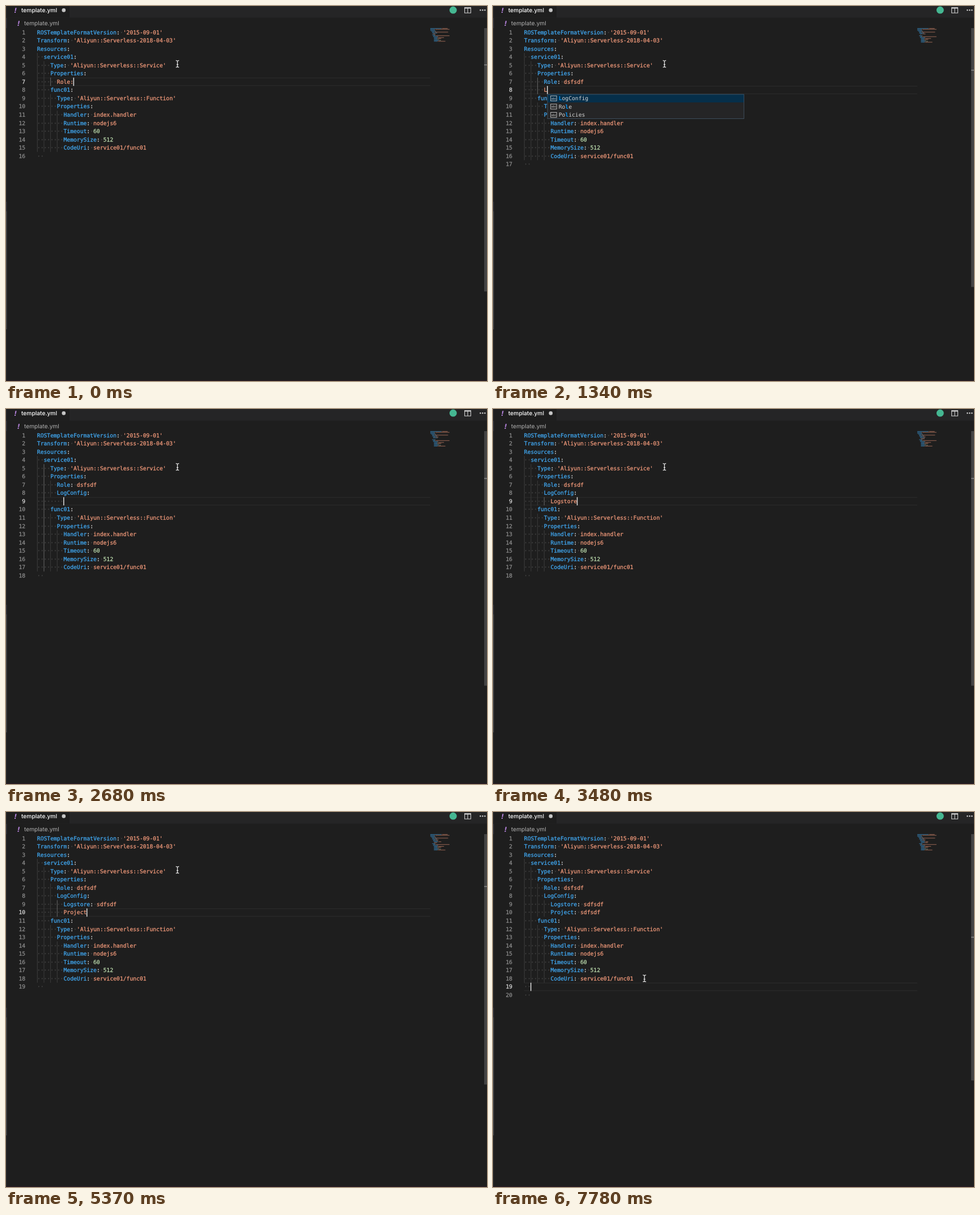
Write an HTML page that moves like this. It is 848 by 661 pixels and loops after 8 s.

```html
<!DOCTYPE html>
<html lang="en">
<head>
<meta charset="utf-8">
<title>template.yml</title>
<style>
  html, body { margin: 0; width: 100%; height: 100%; overflow: hidden; background: #1e1e1e; }
  svg { display: block; width: 848px; height: 661px; }
  text { white-space: pre; text-rendering: geometricPrecision; }
  .code { font: 9.7px "DejaVu Sans Mono", monospace; stroke-width: .28px; }
  .ui { font: 10.2px Inter, "Liberation Sans", sans-serif; }
  .title { font-weight: 500; }
  .mark { font: italic bold 12px "DejaVu Sans", sans-serif; fill: #b180d7; }
  .hit { fill: #0097fb; font-weight: bold; }
</style>
</head>
<body>
<svg viewBox="0 0 848 661">
  <rect width="848" height="661" fill="#1e1e1e"/>
  <rect width="848" height="20.5" fill="#252526"/>
  <rect width="112" height="20.5" fill="#1e1e1e"/>
  <g id="chrome">
    <rect width="1.5" height="661" fill="#29292a"/>
    <rect y="21" width="1.5" height="18" fill="#37373d"/>
    <rect y="345" width="1.5" height="17" fill="#37373d"/>
    <rect y="362" width="1.5" height="208" fill="#4b4b4b"/>
    <rect y="659.5" width="848" height="1.5" fill="#291a22"/>
    <text class="mark" x="14" y="12">!</text>
    <text class="ui title" x="27" y="11.3" fill="#fff">template.yml</text>
    <circle cx="101.8" cy="7.4" r="3.3" fill="#c5c5c5"/>
    <text class="mark" x="19.5" y="34.5">!</text>
    <text class="ui" x="32" y="33.8" fill="#b0b0b0">template.yml</text>
    <circle cx="788.3" cy="7.2" r="6.4" fill="#45b792"/>
    <path d="M808.6 3.5H819.4V12.3H808.6ZM814 3.5V12.3" fill="none" stroke="#d0d0d0" stroke-width="1.1"/>
    <rect x="808" y="2.2" width="12" height="2.3" fill="#d0d0d0"/>
    <g fill="#d0d0d0">
      <circle cx="836.3" cy="7.2" r="1.2"/><circle cx="840.3" cy="7.2" r="1.2"/><circle cx="844.3" cy="7.2" r="1.2"/>
    </g>
  </g>
  <g id="editor"></g>
  <g id="mouse" fill="none" stroke="#f0f0f0" stroke-width="1.2">
    <path d="M-2.8 -5.8Q-.4 -5.8 0 -4.6Q.4 -5.8 2.8 -5.8M0 -4.6V4.8M-2.8 6Q-.4 6 0 4.8Q.4 6 2.8 6M-1.5 1.4H1.5"/>
  </g>
</svg>
<script>
const LOOP = 8000, TOP = 39, LEFT = 54.8, ROW = 14.55, CHAR = 5.84, VIEW = 626;
const MAP = { x: 748, row: 1.616, char: 0.806 };
const KEY = '#41a9f3', STR = '#f0997a', NUM = '#bcdcae', PLAIN = '#dedede', DOT = '#484848';

const head = `ROSTemplateFormatVersion: '2015-09-01'
Transform: 'Aliyun::Serverless-2018-04-03'
Resources:
  service01:
    Type: 'Aliyun::Serverless::Service'
    Properties:`.split('\n');
const tail = `    func01:
      Type: 'Aliyun::Serverless::Function'
      Properties:
        Handler: index.handler
        Runtime: nodejs6
        Timeout: 60
        MemorySize: 512
        CodeUri: service01/func01`.split('\n');

const IN6 = ' '.repeat(6), IN8 = ' '.repeat(8);
const role = [IN6 + 'Role: dsfsdf'];
const config = [...role, IN6 + 'LogConfig:'];
const store = [...config, IN8 + 'Logstore: sdfsdf'];
const done = [...store, IN8 + 'Project: sdfsdf'];
const NEAR = [267, 293.2];

// [start, typed lines, options]; the caret sits at the end of the last typed line by default
const steps = [
  [0, [IN6 + 'Role:'], { raw: STR }],
  [270, [IN6 + 'Role: ds']],
  [540, role],
  [800, [...role, IN6]],
  [1340, [...role, IN6 + 'L'], { raw: STR, list: ['LogConfig', 'Role', 'Policies'], hit: 1 }],
  [1880, [...role, IN6 + 'Log'], { raw: PLAIN }],
  [2140, [...role, IN6 + 'LogConfig'], { raw: PLAIN }],
  [2410, config],
  [2680, [...config, IN8]],
  [3220, [...config, IN8 + 'L'], { raw: STR, list: ['Logstore'], hit: 1 }],
  [3480, [...config, IN8 + 'Logstore'], { raw: STR }],
  [3750, [...config, IN8 + 'Logstore:']],
  [4020, [...config, IN8 + 'Logstore: sd']],
  [4290, store],
  [4560, [...store, IN8]],
  [5100, [...store, IN8 + 'P'], { raw: STR, list: ['Project'], hit: 1 }],
  [5370, [...store, IN8 + 'Project'], { raw: STR }],
  [5640, [...store, IN8 + 'Project: ']],
  [5910, [...store, IN8 + 'Project: sdfs'], { list: ['sdfsdf'], hit: 4 }],
  [6180, done, { list: ['sdfsdf'], hit: 6 }],
  [6440, done, { list: ['sdfsdf'], hit: 6, mouse: [264, 290.5] }],
  [6710, done, { list: ['sdfsdf'], hit: 6, mouse: NEAR, caretOff: true }],
  [6980, done, { mouse: NEAR, row: 17 }],
  [7240, done, { mouse: NEAR, row: 18, blank: 8 }],
  [7510, done, { mouse: NEAR, row: 18, blank: 4 }],
  [7780, done, { mouse: NEAR, row: 18, blank: 2 }]
];

const rect = (x, y, w, h, fill, extra = '') =>
  `<rect x="${x}" y="${y}" width="${w}" height="${h}" fill="${fill}" ${extra}/>`;
const text = (x, y, body, attrs = '') => `<text class="code" x="${x}" y="${y}" ${attrs}>${body}</text>`;
const ink = color => `fill="${color}" stroke="${color}"`;
const span = (body, color) => `<tspan ${ink(color)}>${body}</tspan>`;
const rowY = row => TOP + row * ROW;
const colX = col => LEFT + col * CHAR;
const indentOf = line => line.search(/\S|$/);

function tokens(line, raw) {
  const pad = indentOf(line), body = line.slice(pad);
  const list = [[line.slice(0, pad), DOT]];
  const pair = !raw && body.match(/^([^:]+)(:)(\s*)(.*)$/);
  if (!pair) return [...list, [body, raw || PLAIN]];
  const [, key, colon, gap, value] = pair;
  return [...list, [key, KEY], [colon, PLAIN], [gap, DOT], [value, /^\d+$/.test(value) ? NUM : STR]];
}

// Blank lines take their depth from the next line that has text.
function guideDepths(lines) {
  return lines.map((line, i) => {
    const next = line.trim() ? line : lines.slice(i).find(l => l.trim()) || '';
    return Math.ceil(indentOf(next) / 2);
  });
}

function drawGuides(lines, active) {
  const depths = guideDepths(lines), depth = depths[active];
  let from = active, to = active;
  while (depths[from - 1] >= depth) from--;
  while (depths[to + 1] >= depth) to++;
  let out = '';
  depths.forEach((count, row) => {
    for (let d = 0; d < count; d++) {
      const lit = d === depth - 1 && row >= from && row <= to;
      out += rect(colX(2 * d).toFixed(1), rowY(row), 0.9, ROW, lit ? '#707070' : '#404040');
    }
  });
  return out;
}

function drawLine(line, row, active, raw) {
  const y = rowY(row) + 10.5;
  const parts = tokens(line, raw);
  let col = 0, map = '';
  for (const [body, fill] of parts) {
    if (fill !== DOT && body) {
      map += rect(MAP.x + col * MAP.char, TOP + row * MAP.row, body.length * MAP.char, 1.05, fill, 'opacity=".55"');
    }
    col += body.length;
  }
  const body = parts.map(([s, fill]) => span(fill === DOT ? s.replace(/ /g, '·') : s, fill)).join('');
  const number = text(34.2, y, row + 1, `text-anchor="end" ${ink(active ? '#d8d8d8' : '#8c8c8c')}`);
  return number + text(LEFT, y, body) + map;
}

function drawList(items, hit, row, col) {
  const x = colX(col), y = rowY(row + 1), w = 347;
  let out = rect(x, y, w, ROW * items.length, '#252526');
  items.forEach((item, i) => {
    const top = y + i * ROW;
    if (!i) out += rect(x, top, w, ROW, '#062f4a');
    out += rect(x + 6, top + 3, 10.5, 8.8, 'none', 'stroke="#c5c5c5" stroke-width=".9"');
    out += text(x + 7, top + 9.2, 'abc', 'style="font-size:5px" fill="#d4d4d4"');
    const at = item.toLowerCase().indexOf(i ? 'l' : item[0].toLowerCase());
    const label = `${item.slice(0, at)}<tspan class="hit">${item.slice(at, at + hit)}</tspan>${item.slice(at + hit)}`;
    out += text(x + 20, top + 10.8, label, 'fill="#d4d4d4"');
  });
  return out + rect(x + 0.4, y + 0.4, w - 0.8, ROW * items.length - 0.8, 'none', 'stroke="#45596a" stroke-width=".8"');
}

const editor = document.getElementById('editor');
const mouse = document.getElementById('mouse');

function render([, typed, opt = {}]) {
  const lines = [...head, ...typed, ...tail];
  if (opt.blank) lines.push(' '.repeat(opt.blank));
  lines.push('  ');
  const row = opt.row ?? head.length + typed.length - 1;
  const col = lines[row].length, y = rowY(row);
  const full = VIEW + (lines.length - 1) * ROW;

  let out = rect(LEFT, y, MAP.x - LEFT, 1.1, '#2b2b2b') + rect(LEFT, y + ROW - 1.1, MAP.x - LEFT, 1.1, '#2b2b2b');
  out += drawGuides(lines, row);
  lines.forEach((line, i) => { out += drawLine(line, i, i === row, i === row && opt.raw); });
  if (!opt.caretOff) out += rect(colX(col) - 0.5, y, 1.5, ROW, '#dedede');
  out += rect(843, TOP, 5, VIEW * VIEW / full, '#434343');
  out += rect(843, TOP + row * ROW / full * VIEW - 0.8, 5, 1.6, '#858585');
  if (opt.list) out += drawList(opt.list, opt.hit, row, col);
  editor.innerHTML = out;
  mouse.setAttribute('transform', `translate(${opt.mouse || [302.3, 102]})`);
}

let shown;
const start = performance.now();
function tick() {
  const t = (performance.now() - start) % LOOP;
  const step = steps.findLast(s => s[0] <= t) || steps[0];
  if (step !== shown) render(shown = step);
  requestAnimationFrame(tick);
}
tick();
</script>
</body>
</html>
```
